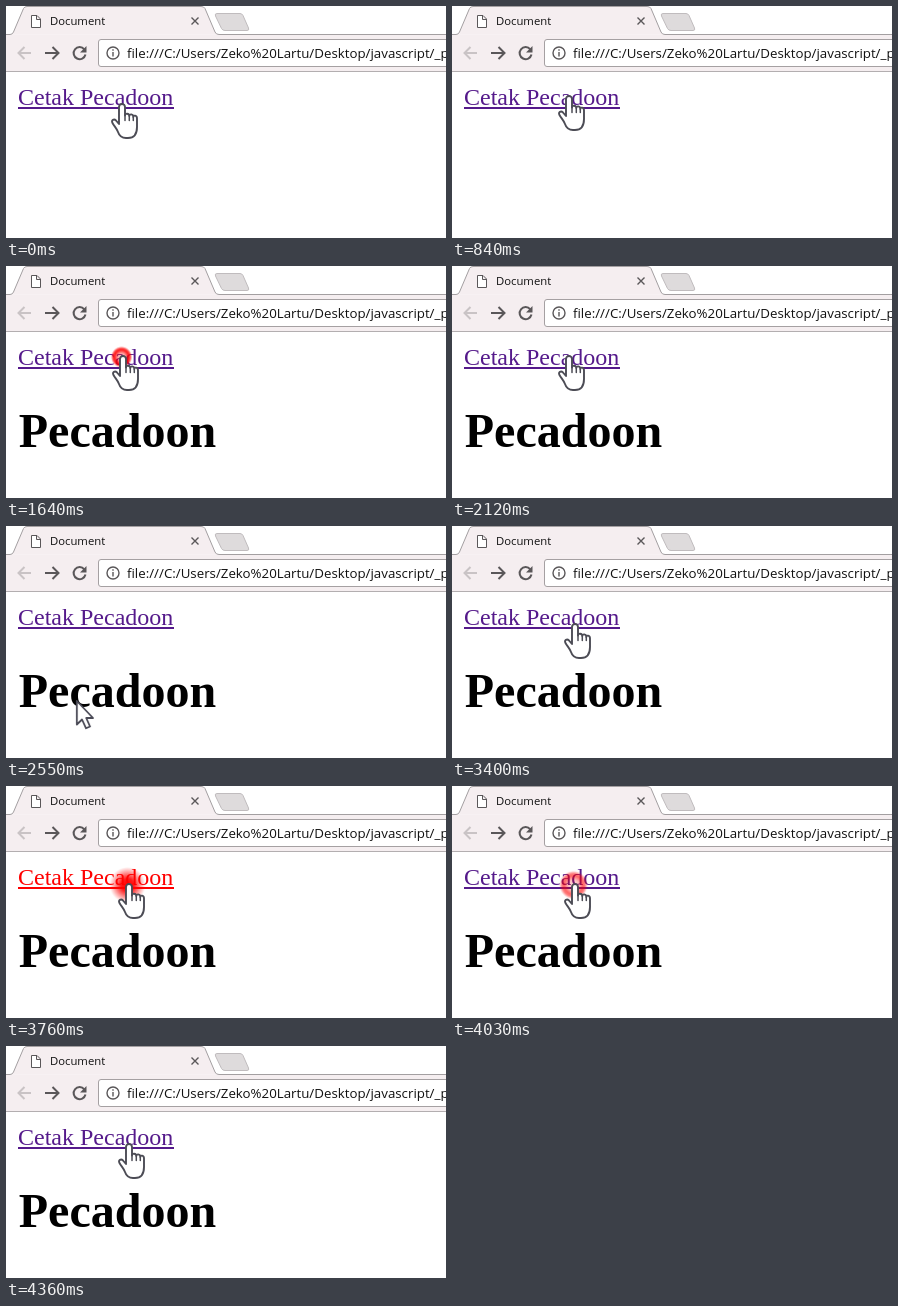
Write an HTML page that moves like this. It is 440 px wide and 232 px high and loops after 4.79 s.

```html
<!DOCTYPE html>
<html lang="id">
<head>
<meta charset="utf-8">
<title>Document</title>
<style>
  html, body { margin: 0; width: 100%; height: 100%; overflow: hidden; background: #fff; }
  svg { display: block; width: 440px; height: 232px; }

  .ui { font-family: "Open Sans", sans-serif; fill: #111; }
  .page { font-family: "Liberation Serif", serif; }
  .icon { fill: none; stroke: #5a5759; stroke-width: 2; }
  .thin { stroke-width: 1.4; }

  /* One loop is 4790 ms; 1% = 47.9 ms. */
  #link, #heading, #cursor, #hand, #arrow, #press, #ripple {
    animation: 4790ms linear infinite;
  }
  #link { animation-name: link; animation-timing-function: step-end; }
  #heading { animation-name: heading; animation-timing-function: step-end; }
  #hand { animation-name: hand; animation-timing-function: step-end; }
  #arrow { animation-name: arrow; animation-timing-function: step-end; }
  #cursor { animation-name: move; }
  #press { animation-name: press; }
  #ripple { animation-name: ripple; }

  @keyframes link {
    0%, 32.99%, 79.75%, 100% { fill: #551a8b; }
    29.23%, 73.49% { fill: #f00; }
  }
  @keyframes heading {
    0% { opacity: 0; }
    32.99%, 100% { opacity: 1; }
  }
  @keyframes hand {
    0%, 66.4%, 100% { opacity: 1; }
    47.9% { opacity: 0; }
  }
  @keyframes arrow {
    0%, 66.4%, 100% { opacity: 0; }
    47.9% { opacity: 1; }
  }
  @keyframes move {
    0%, 3.6% { transform: translate(116px, 98px); }
    6.47%, 17.53% { transform: translate(116px, 90px); }
    17.54% { transform: translate(117px, 90px); }
    46% { transform: translate(117px, 90px); animation-timing-function: ease-in-out; }
    51.36% { transform: translate(73px, 171px); }
    53.24% { transform: translate(70px, 174px); }
    55.11% { transform: translate(70.5px, 173.5px); }
    62% { transform: translate(117px, 129px); }
    62.63% { transform: translate(117px, 124.5px); }
    66.8% { transform: translate(121px, 103px); animation-timing-function: ease-out; }
    71%, 100% { transform: translate(123px, 98px); }
  }
  @keyframes press {
    0%, 29.22%, 33%, 73.48%, 79.76%, 100% { opacity: 0; transform: scale(.5); }
    29.23%, 73.49% { opacity: 1; transform: scale(.5); }
    31.7%, 32.99%, 76%, 79.75% { opacity: 1; transform: none; }
  }
  @keyframes ripple {
    0%, 32.98%, 79.74% { opacity: 0; transform: scale(.42); }
    32.99%, 79.75% { opacity: 1; transform: scale(.42); }
    44.26%, 91.02%, 100% { opacity: 0; transform: none; }
  }
</style>
</head>
<body>
<svg viewBox="0 0 440 232">
  <defs>
    <radialGradient id="glow">
      <stop offset="0" stop-color="#f00"/>
      <stop offset=".35" stop-color="#f00" stop-opacity=".9"/>
      <stop offset=".7" stop-color="#f00" stop-opacity=".4"/>
      <stop offset="1" stop-color="#f00" stop-opacity="0"/>
    </radialGradient>
    <radialGradient id="ring">
      <stop offset="0" stop-color="#f00" stop-opacity=".25"/>
      <stop offset=".35" stop-color="#f00" stop-opacity=".4"/>
      <stop offset=".65" stop-color="#f00"/>
      <stop offset=".8" stop-color="#f00" stop-opacity=".85"/>
      <stop offset="1" stop-color="#f00" stop-opacity="0"/>
    </radialGradient>
  </defs>

  <!-- tab strip -->
  <path d="M0 28.5H440V66H0Z" fill="#f5eef0"/>
  <path d="M0 28.5H4Q6.5 28.5 7.5 26L17.5 2.5Q18.500.5 21 .5H195Q198 .5 199 2.5L209 26Q210 28.500 213 28.500H440"
        fill="#f5eef0" stroke="#a39fa1"/>
  <path d="M211 7.500H234Q236 7.500 237 9.500L242.500 22Q243.500 24.500 241 24.500H219Q216.500 24.500 215.500 22.500L209.500 10Q208.500 7.500 211 7.500Z"
        fill="#dedbdc" stroke="#c0bcbe"/>
  <path d="M25.500 9.500H31L34.500 13V21.500H25.500ZM30.500 9.500V13.500H34.500" fill="#fff" stroke="#5a5759"/>
  <text class="ui" x="44" y="19" font-size="11.300">Document</text>
  <path class="icon thin" d="M185.500 11.500l7 7m0-7l-7 7"/>

  <!-- toolbar -->
  <path d="M0 65.500H440" stroke="#b3aeb0"/>
  <path class="icon" d="M25 47H13M18.500 41L12.500 47L18.500 53" style="stroke:#c9c3c5"/>
  <path class="icon" d="M39 47H52M46.500 41L52.500 47L46.500 53"/>
  <path class="icon" d="M78.300 43.300A6 6 0 1 0 79.500 48.500"/>
  <path d="M80.500 40V46.500H74Z" fill="#5a5759"/>
  <rect x="92.500" y="33.500" width="360" height="27" rx="2.500" fill="#fff" stroke="#a5a0a2"/>
  <circle class="icon thin" cx="107" cy="47" r="6"/>
  <path class="icon thin" d="M107 43.200v1.600m0 1.300v4.500"/>
  <text class="ui" x="121" y="52" font-size="13.300">file:///C:/Users/Zeko%20Lartu/Desktop/javascript/_p</text>

  <!-- page -->
  <g class="page">
    <g id="link">
      <text x="12" y="99" font-size="24">Cetak Pecadoon</text>
      <rect x="12" y="101" width="156" height="2"/>
    </g>
    <text id="heading" x="12.800" y="181" font-size="48" font-weight="bold">Pecadoon</text>
  </g>

  <!-- pointer, with its tip at 0,0 -->
  <g id="cursor">
    <g transform="translate(-1.500 1)">
      <circle id="press" r="18" fill="url(#glow)"/>
      <circle id="ripple" r="22" fill="url(#ring)"/>
    </g>
    <g id="hand" fill="#fff" stroke="#4c4c55" stroke-width="1.900" stroke-linejoin="round" stroke-linecap="round">
      <path d="M-3 3a3 3 0 0 1 6 0V11.500c0-2.500 4.300-2.500 4.300.5c0-2.500 4-2.200 4 1c0-2.200 3.700-1.800 3.700 1.500V23c0 7-3 11-9 11H4c-5 0-7-3-8-6c-1.500-4-4-6-5.500-9c-1.500-3 1.500-4.500 3.500-2.500l3 3.500Z"/>
      <path d="M3 11v5.500M7.300 12.500v4M11.300 13.500v3" fill="none" stroke-width="1.500"/>
    </g>
    <path id="arrow" d="M.8 1V24.500L6 19.500L10 28.300L14 26.500L10.200 18H17Z"
          fill="#fff" stroke="#4a4a56" stroke-width="1.800" stroke-linejoin="round"/>
  </g>
</svg>
</body>
</html>
```
